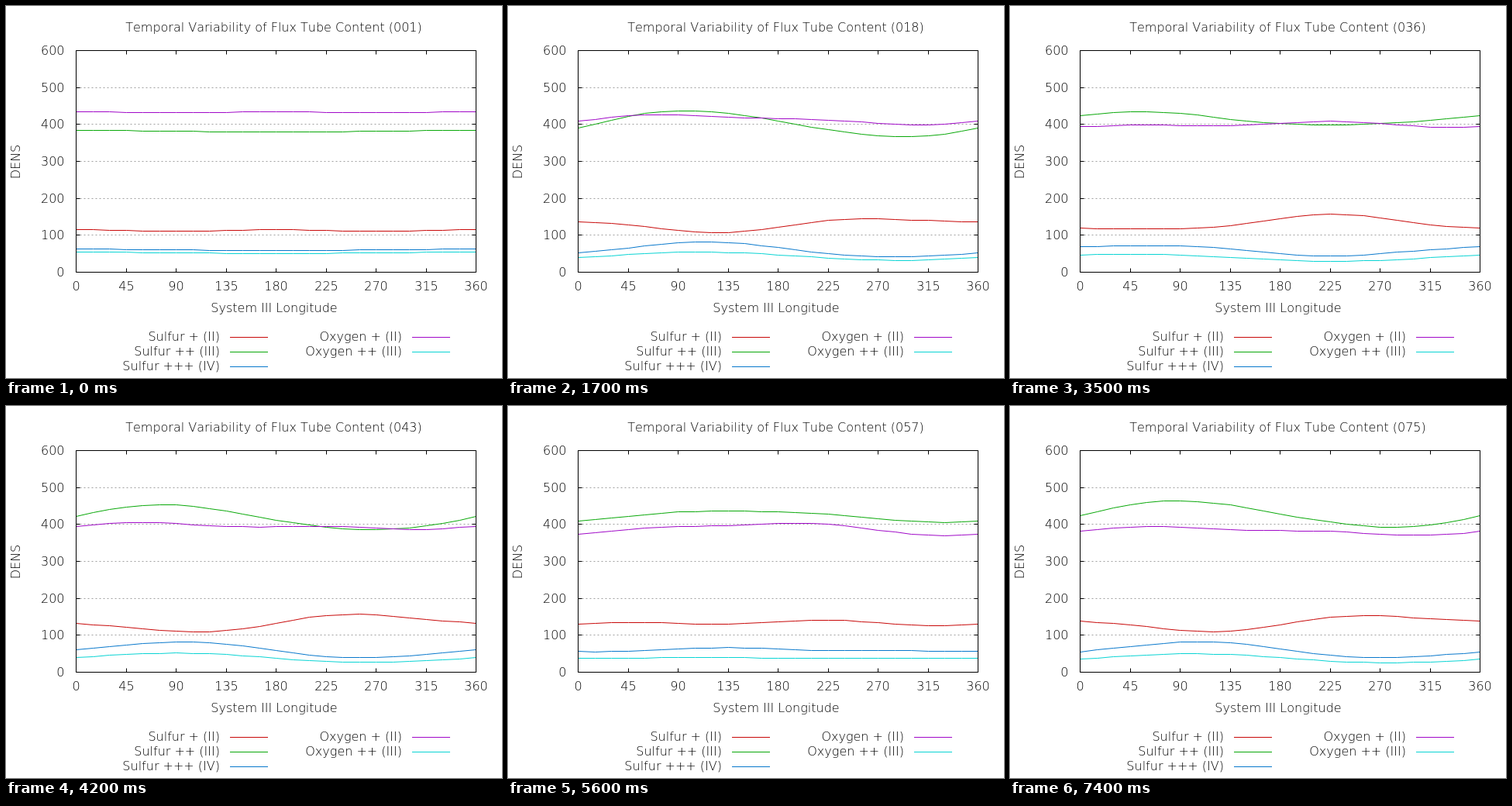
These frames come from a looping animation (640x480 px, 7500 ms). An HTML page:

```html
<!DOCTYPE html>
<html lang="en">
<head>
<meta charset="utf-8">
<title>Flux tube content</title>
<style>
  html, body { margin: 0; width: 100%; height: 100%; overflow: hidden; background: #fff; }
  svg { display: block; width: 640px; height: 480px; }
  text { font: 200 16px "DejaVu Sans", Verdana, sans-serif; font-kerning: none; fill: #000; }
  .mid { text-anchor: middle; }
  .end { text-anchor: end; }
  path { fill: none; stroke-width: 1; }
  .axis { stroke: #000; }
  .grid { stroke: #a0a0a0; stroke-dasharray: 2 3; }
</style>
</head>
<body>
<svg id="chart" viewBox="0 0 640 480"></svg>
<script>
const chart = document.getElementById("chart");
const LEFT = 90.5, RIGHT = 606.5, TOP = 57.5, BOTTOM = 343.5;
const FRAMES = 75, STEP = 100;
const RAD = Math.PI / 180;
const DRIFT = 12.2;  // degrees per step
const GROWTH = 10;   // steps until the waves are full size

function add(tag, attrs, content = "") {
  const el = document.createElementNS("http://www.w3.org/2000/svg", tag);
  for (const name in attrs) el.setAttribute(name, attrs[name]);
  el.textContent = content;
  return chart.appendChild(el);
}
const label = (x, y, content, cls) => add("text", { x, y, class: cls }, content);
const xAt = lon => LEFT + Math.round(lon / 360 * (RIGHT - LEFT));
const yAt = dens => BOTTOM - Math.round(dens / 600 * (BOTTOM - TOP));

// Grid, ticks and labels
let ticks = `M${LEFT} ${TOP}H${RIGHT}V${BOTTOM}H${LEFT}Z`;
let grid = "";
for (let dens = 0; dens <= 600; dens += 100) {
  const y = yAt(dens);
  label(75.5, y + 5.5, dens, "end");
  ticks += `M${LEFT} ${y}h5M${RIGHT} ${y}h-5`;
  if (dens % 600) grid += `M${LEFT} ${y}H${RIGHT}`;
}
for (let lon = 0; lon <= 360; lon += 45) {
  const x = xAt(lon);
  label(x, 367, lon, "mid");
  ticks += `M${x} ${TOP}v5M${x} ${BOTTOM}v-5`;
}
add("path", { class: "grid", d: grid });
const title = label(345.5, 33, "", "mid");
label(346, 395, "System III Longitude", "mid");
add("text", { class: "mid", transform: "translate(17.5 201) rotate(-90)" }, "DENS");

// Each density is a mean that settles from start by change, plus waves in longitude:
// a fixed one, a drifting one (size, phase), a double one, and a faint initial ripple.
const species = [
  { name: "Sulfur + (II)", color: "#c80808", start: 113, change: 20, settle: 11,
    fixed: [-2.9, -11.5], size: 10.8, phase: 131, double: [0, 5], ripple: [2, 1.8] },
  { name: "Sulfur ++ (III)", color: "#08a808", start: 381.6, change: 52, settle: 35,
    fixed: [-2.6, 20.3], size: 15.2, phase: -93, double: [-1.5, 2], ripple: [1, 2.3] },
  { name: "Sulfur +++ (IV)", color: "#0878cc", start: 60.4, change: -0.5, settle: 10,
    fixed: [-0.5, 11.5], size: 9.6, phase: -72, double: [-0.7, -2], ripple: [1, 2] },
  { name: "Oxygen + (II)", color: "#a008c8", start: 433.2, change: -62, settle: 44,
    fixed: [-6.7, 4.7], size: 7.5, phase: -142, double: [-0.8, 4.3], ripple: [2, 1.2] },
  { name: "Oxygen ++ (III)", color: "#08d4d4", start: 52.3, change: -15, settle: 18,
    fixed: [0.7, 6.9], size: 5.7, phase: -64, double: [-0.1, -0.2], ripple: [1, 1.8] }
];

species.forEach((s, i) => {
  const x = i < 3 ? 276 : 511, y = 427.5 + 19 * (i % 3);
  label(x, y + 4.5, s.name, "end");
  add("path", { stroke: s.color, d: `M${x + 13} ${y}h49` });
  s.line = add("path", { stroke: s.color });
});
add("path", { class: "axis", d: ticks });

const wave = ([c, s], angle) => c * Math.cos(angle) + s * Math.sin(angle);

function density(s, lon, n) {
  const a = lon * RAD;
  const grown = Math.min(1, n / GROWTH);
  const mean = s.start + s.change * (1 - Math.exp(-n / s.settle));
  const drifting = s.size * Math.cos(a - (DRIFT * n + s.phase) * RAD);
  const [order, amp] = s.ripple;
  return mean + grown * (wave(s.fixed, a) + drifting + wave(s.double, 2 * a))
    + (1 - grown) * amp * Math.cos(order * a);
}

function curve(s, n) {
  const points = [];
  for (let lon = 0; lon <= 360; lon += 15)
    points.push(xAt(lon) + " " + yAt(density(s, lon, n)));
  return "M" + points.join("L");
}

let shown = -1;
function draw(n) {
  if (n === shown) return;
  shown = n;
  title.textContent =
    `Temporal Variability of Flux Tube Content (${String(n + 1).padStart(3, "0")})`;
  for (const s of species) s.line.setAttribute("d", curve(s, n));
}

const start = performance.now();
function tick() {
  draw(Math.floor((performance.now() - start) / STEP) % FRAMES);
  requestAnimationFrame(tick);
}
draw(0);
requestAnimationFrame(tick);
</script>
</body>
</html>
```
